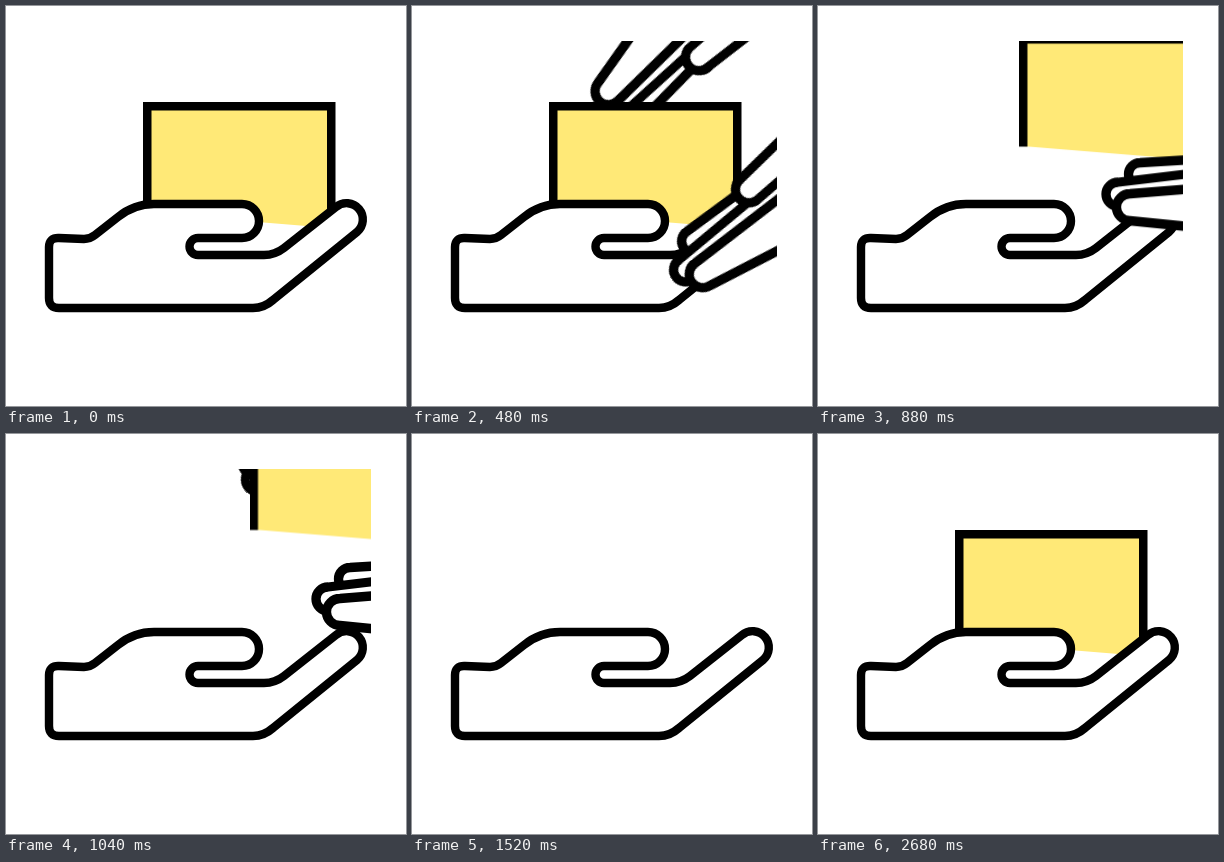
An HTML page that plays this animation: 400x400 px, repeating every 3320 ms.

```html
<!DOCTYPE html>
<html lang="en">
<head>
<meta charset="utf-8">
<title>Handover</title>
<style>
  html, body { margin: 0; width: 100%; height: 100%; overflow: hidden; background: #fff; }
  svg { display: block; width: 100%; height: 100%; }
  .line { fill: #fff; stroke: #000; stroke-width: 8.4; stroke-linejoin: round; }
  #fingers { stroke-width: 9.3; }
</style>
</head>
<body>
<svg viewBox="0 0 400 400">
  <defs>
    <clipPath id="window"><rect x="35" y="35" width="330" height="330"/></clipPath>
    <g id="fingers" class="line"></g>
  </defs>
  <g clip-path="url(#window)">
    <g id="upper"><use href="#fingers" transform="scale(1 -1)"/></g>
    <g id="card">
      <path fill="#ffe977" d="M141 100H325V222L141 207Z"/>
      <path d="M137 96H329.500V222H321V104.500H145.500V207.500H137Z"/>
    </g>
    <path class="line" d="M43 241Q43 231.500 53 232L78 233Q84 233 89 229L112 211Q128 198 148 198
      H236A17 17 0 0 1 236 232H192A8.500 8.500 0 0 0 192 249H258Q269 249 278 242L330 201
      A16.300 16.300 0 0 1 351 226L267 294Q258 302 247 302H53Q43 302 43 292Z"/>
    <g id="lower"><use href="#fingers"/></g>
  </g>
</svg>
<script>
const TICK = 40, TICKS = 83, REACH = 260;
const GRIP = 14, LEAVE = 16, TURN = 6, DROP = 62, LAND = 67;

// A long finger with a round tip at x, y; its sides run off with the given slopes
function finger(x, y, r, up, down) {
  const end = x + REACH, top = y - r, bottom = y + r;
  return `<path d="M${end} ${top + up * REACH}L${x} ${top}` +
    `A${r} ${r} 0 0 0 ${x} ${bottom}L${end} ${bottom + down * REACH}"/>`;
}

document.getElementById('fingers').innerHTML =
  finger(10, -33, 11.5, -.06, 0) +
  finger(-12, -13, 12, -.12, 0) +
  finger(0, 0, 13.5, -.08, .1) +
  finger(85, -46, 13.5, -.2, -.14);

const clamp = v => Math.min(1, Math.max(0, v));
const place = (x, y, angle = 0) => `translate(${x}px, ${y}px) rotate(${angle}deg)`;

// Position on the way from start to grip, then moving off at a steady speed
function reach(tick, start, grip, speed) {
  const near = 1 - (1 - clamp(tick / GRIP)) ** 1.2;
  const away = Math.max(0, tick - LEAVE);
  return [0, 1].map(i => start[i] + (grip[i] - start[i]) * near + speed[i] * away);
}

const poses = {
  upper(tick) {
    const [x, y] = reach(tick, [276, -6], [188, 95], [6.15, -6.7]);
    return place(x, y, -49);
  },
  lower(tick) {
    const [x, y] = reach(tick, [400, 196], [279, 276], [5.5, -5.8]);
    const turn = clamp((tick - LEAVE) / TURN);
    return place(x, y - 40 * turn, 33 * (turn - 1));
  },
  card(tick) {
    const away = Math.max(0, tick - LEAVE), left = Math.max(0, LAND - tick);
    return tick < DROP ? place(10.65 * away, -11.15 * away) : place(left, -41.75 * left);
  },
};

for (const [id, pose] of Object.entries(poses)) {
  const frames = Array.from({ length: TICKS + 1 }, (_, tick) => (
    { offset: tick / TICKS, transform: pose(tick), easing: 'steps(1)' }
  ));
  const animation = document.getElementById(id)
    .animate(frames, { duration: TICKS * TICK, iterations: Infinity });
  animation.startTime = document.timeline.currentTime;
}
</script>
</body>
</html>
```
